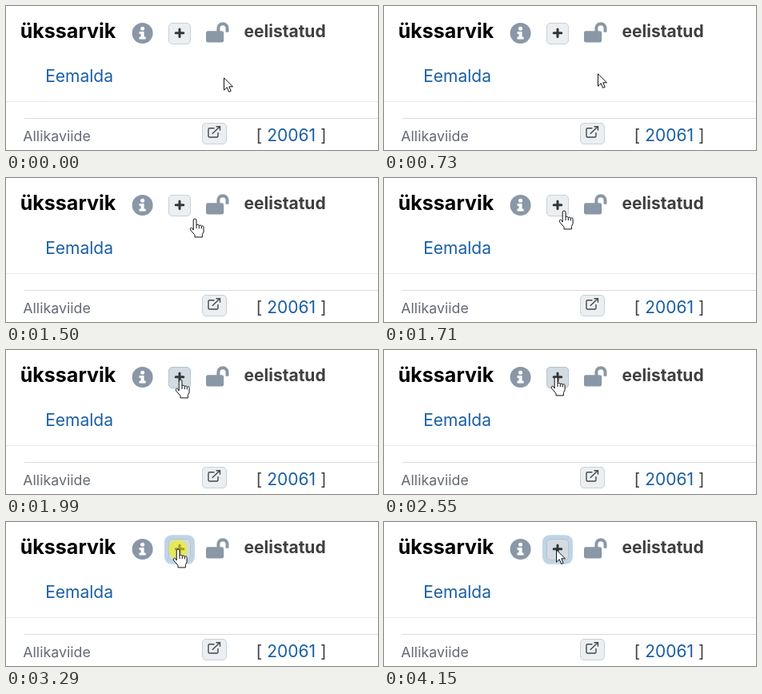
Animation, 465 px wide and 180 px high, one loop 4.59 s. Source, as an HTML page:

```html
<!DOCTYPE html>
<html lang="et">
<head>
<meta charset="utf-8">
<title>ükssarvik</title>
<style>
  html, body { margin: 0; width: 100%; height: 100%; overflow: hidden; background: #fff; }
  svg { display: block; width: 465px; height: 180px; }
  text { font-family: Inter, "Open Sans", sans-serif; font-size: 21px; white-space: pre; }
  .icon { fill: #8a97a6; }
  .button { fill: #ebeff2; stroke: #c8d0d8; }
  .link { fill: #1a5fa3; }
</style>
</head>
<body>
<svg viewBox="0 0 465 180" xmlns="http://www.w3.org/2000/svg">
  <rect width="465" height="180" fill="#fff"/>
  <rect y="119" width="465" height="1" fill="#ebebeb"/>
  <rect x="23" y="140" width="442" height="1" fill="#dcdcdc"/>

  <text x="17.8" y="40" style="font-size:25px" font-weight="700">ükssarvik</text>
  <text x="297.5" y="39" font-weight="700" fill="#3f3f41">eelistatud</text>
  <text x="49.2" y="95" class="link">Eemalda</text>
  <text x="21.3" y="169" style="font-size:17.8px" fill="#646a76">Allikaviide</text>
  <text x="312.6" y="169" fill="#444">[ <tspan class="link">20061</tspan> ]</text>

  <!-- info -->
  <circle class="icon" cx="170.6" cy="34" r="13"/>
  <g fill="#fff">
    <circle cx="170.6" cy="28.2" r="2.5"/>
    <path d="M166.600 32h6v6.500h2v3h-8v-3h2v-3.500h-2z"/>
  </g>

  <!-- open padlock -->
  <path class="icon" transform="translate(250 20.2) scale(.0495)" d="M424 0C340 0 272 69 272 153V224H48q-48 0-48 48V464q0 48 48 48H400q48 0 48-48V272q0-48-48-48H352V153a72 72 0 0 1 144 0V232q0 24 24 24h32q24 0 24-24V152C576 68 508 0 424 0z"/>

  <!-- add button -->
  <rect id="ring" x="198" y="16.2" width="38" height="36.6" rx="9" fill="#bfd5e6" opacity="0"/>
  <rect class="button" x="203.5" y="21.5" width="27" height="26" rx="4.5"/>
  <rect id="hover" x="203.5" y="21.5" width="27" height="26" rx="4.5" fill="#d2dce2" stroke="#b6c4ce" opacity="0"/>
  <path d="M217 28.900v9.600M212.200 33.700h9.600" stroke="#343638" stroke-width="3" stroke-linecap="round"/>
  <circle id="press" cx="215" cy="34" r="12" fill="#f4f000" fill-opacity=".56"/>

  <!-- open-in-new button -->
  <rect class="button" x="245.5" y="146.5" width="30" height="26" rx="4.5"/>
  <g fill="none" stroke="#45484c" stroke-width="1.400">
    <path d="M260.500 152.700h-6q-1.500 0-1.500 1.500v8.300q0 1.500 1.500 1.500h9q1.500 0 1.500-1.500v-4.500"/>
    <path d="M257.800 159.800l9-8.600M262.500 150.700h5v5"/>
  </g>

  <!-- pointers, both with the hotspot at 0,0 -->
  <g id="pointer" fill="#fff" stroke="#111" stroke-linejoin="round">
    <path id="arrow" d="M.5.9V16.200L4.200 12.700L6.700 18.400L9.200 17.300L6.800 11.800H11.500Z"/>
    <g id="hand" transform="translate(-.3 -.5)">
      <path d="M-1.500 14.500V2.400a1.900 1.900 0 0 1 3.800 0V8.500a1.800 1.800 0 0 1 3.300.6a1.700 1.700 0 0 1 3 .8a1.600 1.600 0 0 1 2.800 1.400V16.500L9.700 20V23.400H.3V20.800L-5 14.600C-6.300 12.200-4.200 10.700-2.800 12.400Z"/>
      <path d="M2.300 8.500v4M5.600 9.100v3.600M8.600 9.900v3" fill="none"/>
    </g>
  </g>
</svg>
<script>
  const LOOP = 4590, STEP = 70;
  const START = [272, 89];
  // start time, number of steps, end x, end y
  const MOVES = [
    [660, 8, 250, 67],
    [1220, 5, 236, 51],
    [1570, 3, 225, 41],
    [1780, 4, 218, 37],
    [2060, 3, 217, 35],
    [2330, 1, 216, 35],
    [2550, 1, 215, 34]
  ];
  const get = id => document.getElementById(id);
  const [ring, hover, press, pointer, arrow, hand] =
    ["ring", "hover", "press", "pointer", "arrow", "hand"].map(get);

  // progress 0..1, advancing once per STEP
  function stepped(t, start, count) {
    const done = Math.floor((t - start) / STEP) + 1;
    return Math.max(0, Math.min(1, done / count));
  }

  function position(t) {
    let [x, y] = START;
    for (const [start, count, toX, toY] of MOVES) {
      const p = stepped(t, start, count);
      x += (toX - x) * p;
      y += (toY - y) * p;
    }
    return [Math.round(x), Math.round(y)];
  }

  function show(el, on) {
    el.setAttribute("visibility", on ? "visible" : "hidden");
  }

  function draw(t) {
    const isHand = t >= 1430 && t < 4150;
    pointer.setAttribute("transform", `translate(${position(t)})`);
    show(arrow, !isHand);
    show(hand, isHand);
    hover.setAttribute("opacity", stepped(t, 1780, 3));
    ring.setAttribute("opacity", stepped(t, 3080, 4));
    show(press, t >= 3080 && t < 4150);
  }

  function tick() {
    draw((performance.now() + 1) % LOOP);
    requestAnimationFrame(tick);
  }
  tick();
</script>
</body>
</html>
```
